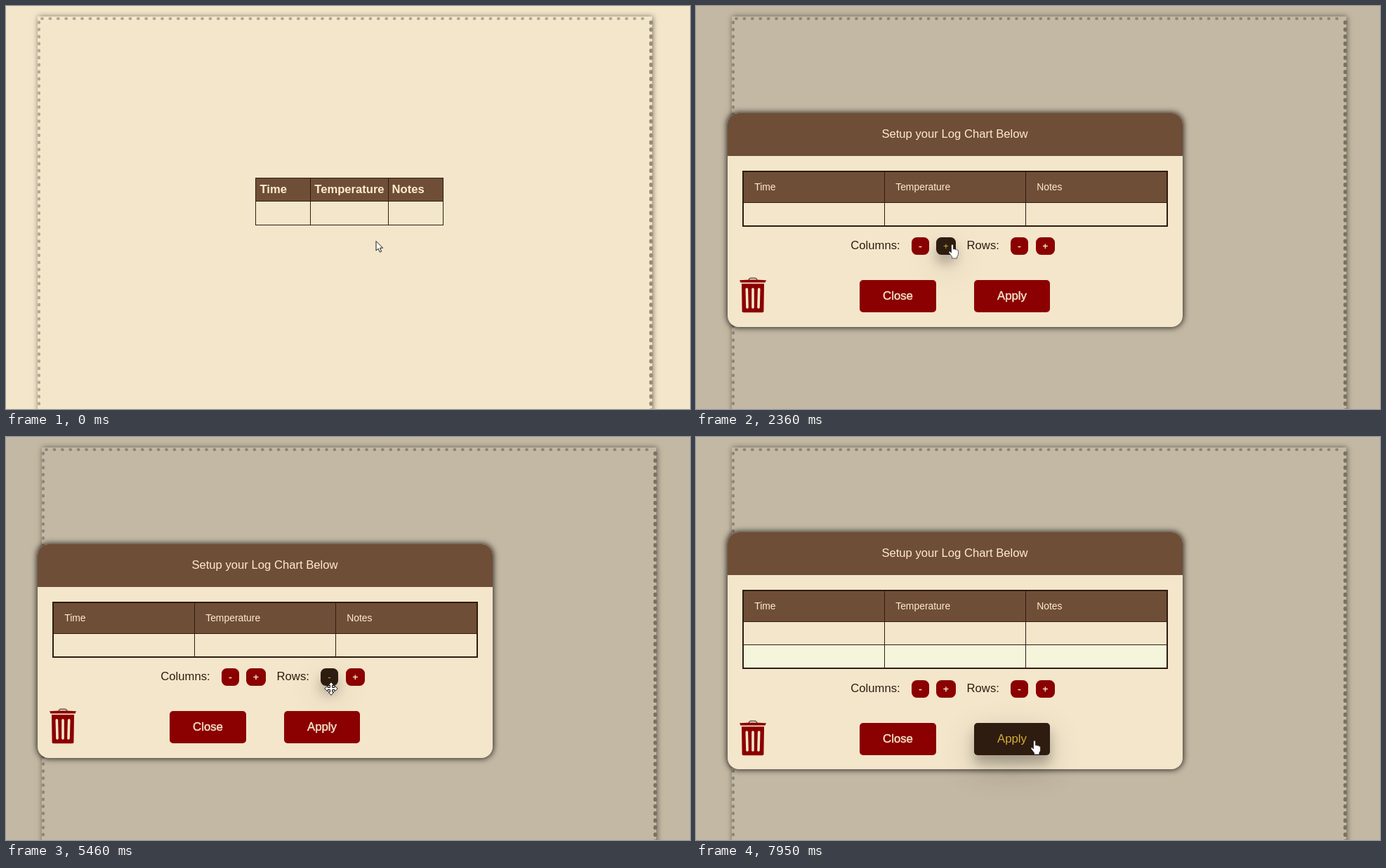
Animation, 974 px wide and 575 px high, one loop 8000 ms. Source, as an HTML page:

```html
<!DOCTYPE html>
<html lang="en">
<head>
<meta charset="utf-8">
<title>Log chart setup</title>
<style>
  :root { --cream: #f4e6cb; --brown: #6f4e37; --dark: #2e1c10; --pale: #ffebcd; }
  html, body { margin: 0; width: 100%; height: 100%; overflow: hidden; background: var(--cream); }
  body { font-family: "Liberation Sans", Arial, sans-serif; }
  div, svg { position: absolute; box-sizing: border-box; }
  svg { overflow: visible; left: 0; top: 0; }
  #stage { width: 974px; height: 575px; left: 0; top: 0; overflow: hidden; background: var(--cream); }
  #page, #low { left: 0; }
  .sheet { box-shadow: 1px 0 8px rgba(0,0,0,.5); background: var(--cream); }
  .text { white-space: pre; line-height: 20px; }
  .head { background: var(--brown); }
  .line { background: var(--dark); }
  #shade { inset: 0; background: rgba(0,0,0,.2); }
  #dialog { left: 45px; width: 648px; border-radius: 16px; background: var(--cream);
            box-shadow: 0 0 9px 1px rgba(0,0,0,.8); }
  .btn { text-align: center; color: var(--cream); }
  #click { width: 24px; height: 24px; border-radius: 50%; background: rgba(255,255,0,.5); }
</style>
</head>
<body>
<div id="stage">
  <div id="page"></div>
  <div id="shade"></div>
  <div id="dialog"></div>
  <svg id="cursor" width="1" height="1" stroke="#1a1a1a" fill="#fff" stroke-linejoin="round">
    <path id="arrow" d="M0 .5V14L3.2 11.2 5.4 16.2 7.6 15.2 5.5 10.2H9.6Z"/>
    <path id="move" d="M0-9.3 4-5H1.5V-1.5H5V-4L9.3 0 5 4V1.5H1.5V5H4L0 9.3-4 5H-1.5V1.5H-5V4L-9.3 0-5-4V-1.5H-1.5V-5H-4Z"/>
    <path id="hand" stroke-width=".7" d="M-1.5 0Q0-1.8 1.5 0V6Q3 4.8 4 6.4 5.5 5.4 6.3 7 8 6.6 8.5 8.5V12.5Q8.3 15 6.8 16.5V19H-.5V16.6L-5 10.8Q-5.6 8.8-3.6 9L-1.5 11Z"/>
  </svg>
  <div id="click"></div>
</div>
<script>
const LOOP = 8000, STEP = 10, FADE = 400;
const $ = id => document.getElementById(id);

function box(parent, x, y, w, h, cls = '', style = '') {
  const el = document.createElement('div');
  el.className = cls;
  el.style.cssText = `left:${x}px;top:${y}px;width:${w}px;height:${h}px;${style}`;
  parent.append(el);
  return el;
}

function label(parent, str, x, y, size, style = '') {
  const el = box(parent, x, y - 10, 0, 20, 'text', `font-size:${size}px;${style}`);
  el.style.width = 'auto';
  el.textContent = str;
  return el;
}

function drawing(parent, markup) {
  parent.insertAdjacentHTML('beforeend', `<svg width="1" height="1">${markup}</svg>`);
}

// Perforated sheet with the small chart
const page = $('page');
box(page, 45, 15, 875, 700, 'sheet');
const dots = (d, width, color, gap) =>
  `<path d="${d}" fill="none" stroke="${color}" stroke-width="${width}" stroke-linecap="round" stroke-dasharray="1 ${gap - 1}"/>`;
drawing(page,
  dots('M51 18H915', 3.8, '#b0a692', 11.4) +
  dots('M47 23V590', 4, '#b1a691', 10.07) +
  dots('M918.5 23V590', 5.2, '#998d77', 10.07));

box(page, 355, 245, 268, 68, '', 'border:1px solid var(--dark)');
box(page, 356, 246, 266, 32, 'head');
box(page, 355, 278, 268, 1, 'line');
for (const x of [433, 544]) box(page, x, 245, 1, 68, 'line');
[['Time', 361.5], ['Temperature', 439.3], ['Notes', 549.6]].forEach(([s, x]) =>
  label(page, s, x, 262, 16.6, 'font-weight:bold;color:var(--pale)'));

// Dialog
const dialog = $('dialog');
box(dialog, 0, 0, 648, 61, 'head', 'border-radius:16px 16px 0 0');
label(dialog, 'Setup your Log Chart Below', 219.4, 30, 16.65, 'color:var(--pale)');

const chart = box(dialog, 21, 82, 606, 80);
const extra = box(chart, 1, 79, 604, 33, '', 'background:#f5f5dc');
box(chart, 0, 0, 606, 45, 'head');
box(chart, 0, 45, 606, 1, 'line');
const rule = box(chart, 0, 78, 606, 1, 'line');
for (const x of [202, 403]) box(chart, x, 0, 1, 0, 'line', 'height:100%');
box(chart, 0, 0, 606, 0, '', 'height:100%;border:2px solid var(--dark)');
['Time', 'Temperature', 'Notes'].forEach((s, i) =>
  label(chart, s, 17.2 + 201 * i, 23, 13.9, 'color:var(--pale)'));

const low = box(dialog, 0, 177, 648, 128);
low.id = 'low';
label(low, 'Columns:', 175.3, 12, 16.65, 'color:var(--dark)');
label(low, 'Rows:', 340.6, 12, 16.65, 'color:var(--dark)');
drawing(low, `<g transform="translate(17 57)">
  <path d="M13 4Q14 1.3 16 1.3H22Q24 1.3 25 4" fill="none" stroke="#67564c" stroke-width="1.4"/>
  <path d="M0 4.2Q19 3 38 4.2L36.5 7.5H1.5Z" fill="#8b0000"/>
  <path d="M3 9.3H35L34.4 48.4Q34.3 50.3 32 50.3H6Q3.7 50.3 3.6 48.4Z" fill="#8b0000"/>
  <path d="M10.3 17 11 43M19 17V43M27.7 17 27 43" stroke="#f4e6cb" stroke-width="3.6" stroke-linecap="round"/>
</g>`);

const buttons = [
  ['-', 262, 0, 25, 25], ['+', 297, 0, 28, 25],
  ['-', 403, 0, 25, 25], ['+', 439, 0, 27, 25],
  ['Close', 188, 61, 109, 46], ['Apply', 351, 61, 108, 46]
].map(([s, x, y, w, h]) => {
  const big = h > 30;
  const el = box(low, x, y, w, h, 'btn',
    `border-radius:${big ? 5 : 7.5}px;font-size:${big ? 16.8 : 13.3}px;line-height:${big ? 45 : 25}px`);
  el.textContent = s;
  return { el, x, y, w, h };
});

// Timeline: cursor stops [ms, x, y], button presses, row changes
const stops = [
  [0, 527, 335], [20, 527, 335], [280, 502, 287], [1690, 502, 287],
  [1990, 358, 338], [2360, 365, 341], [2510, 365, 341], [3060, 494, 342],
  [3330, 498, 341], [4570, 498, 341], [5000, 465, 357], [5390, 463, 359],
  [5470, 463, 359], [5960, 498, 344], [6230, 507, 343], [6850, 507, 343],
  [7530, 482, 430], [7700, 482, 434], [LOOP, 482, 434]
];
const presses = [740, 3870, 5390, 6770];
const PRESS = 70, OPEN = 810;

const clamp = v => Math.max(0, Math.min(1, v));
const ease = v => v * v * (3 - 2 * v);
const mix = (a, b, k) => a + (b - a) * k;
const tworows = t => (t >= 3940 && t < 5460) || t >= 6840;

function pointer(t) {
  const i = Math.max(1, stops.findIndex(s => s[0] > t));
  const a = stops[i - 1], b = stops[i], k = ease(clamp((t - a[0]) / (b[0] - a[0])));
  return [mix(a[1], b[1], k), mix(a[2], b[2], k)];
}

function layout(t) {
  return tworows(t)
    ? { top: 136, height: 338, rows: 113, low: 211 }
    : { top: 153, height: 305, rows: 80, low: 177 };
}

function hovered(t) {
  if (t < OPEN) return -1;
  const [px, py] = pointer(t), l = layout(t);
  const x = px - 45, y = py - l.top - l.low;
  return buttons.findIndex(b => x >= b.x && x < b.x + b.w && y >= b.y && y < b.y + b.h);
}

// Hover strength of every button over the whole loop
const glow = buttons.map(() => [0]);
for (let n = 1; n <= LOOP / STEP; n++) {
  const on = hovered(n * STEP);
  glow.forEach((g, i) => g.push(clamp(g[n - 1] + (i === on ? 1 : -1) * STEP / FADE)));
}

const blend = (a, b, k) => `rgb(${a.map((v, i) => Math.round(mix(v, b[i], k)))})`;

function render(t) {
  const l = layout(t), [x, y] = pointer(t), open = t >= OPEN;
  page.style.transform = `translateX(${open ? 6 : 0}px)`;
  const shown = open ? ease(clamp((t - OPEN + 70) / 270)) : 0;
  $('shade').style.opacity = dialog.style.opacity = shown;
  dialog.style.top = l.top + 'px';
  dialog.style.height = l.height + 'px';
  chart.style.height = l.rows + 'px';
  extra.style.display = rule.style.display = tworows(t) ? '' : 'none';
  low.style.top = l.low + 'px';

  buttons.forEach((b, i) => {
    const k = ease(glow[i][Math.floor(t / STEP)]), s = b.el.style;
    s.background = blend([139, 0, 0], [46, 28, 16], k);
    s.color = blend([244, 230, 203], [212, 175, 55], k);
    s.webkitTextStroke = `${.45 * (1 - k)}px`;
    s.boxShadow = k ? `0 ${12 * k}px ${16 * k}px rgba(0,0,0,${.24 * k}),0 ${17 * k}px ${50 * k}px rgba(0,0,0,${.19 * k})` : 'none';
  });

  const shape = hovered(t) >= 0 ? 'hand' : open || y < 313 ? 'move' : 'arrow';
  for (const id of ['arrow', 'move', 'hand']) $(id).style.display = id === shape ? '' : 'none';
  $('cursor').style.transform = `translate(${x}px,${y}px)`;
  const c = $('click').style;
  c.display = presses.some(p => t >= p && t < p + PRESS) ? '' : 'none';
  c.left = x - 13 + 'px';
  c.top = y - 13 + 'px';
}

function tick() {
  render(performance.now() % LOOP);
  requestAnimationFrame(tick);
}
tick();
</script>
</body>
</html>
```
